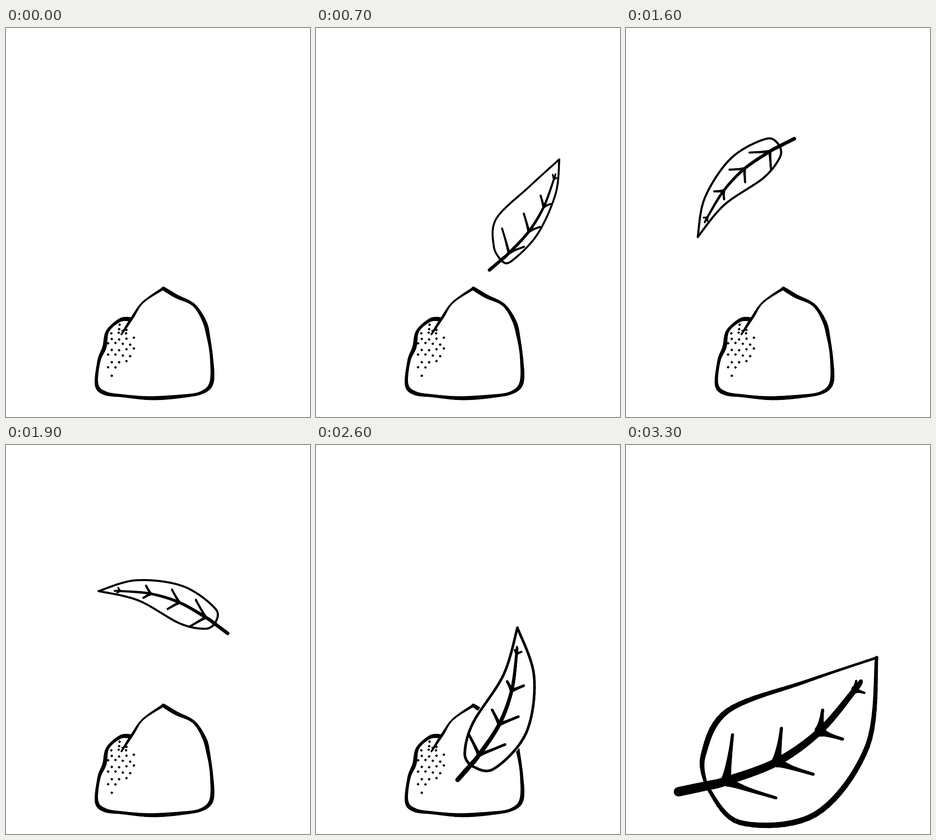
These frames come from a looping animation (661 px wide and 847 px high, 3500 ms). An HTML page with a canvas:

```html
<!DOCTYPE html>
<html lang="en">
<head>
<meta charset="utf-8">
<title>Falling leaf</title>
<style>
  html, body { margin: 0; width: 100%; height: 100%; overflow: hidden; background: #fff; }
  canvas { display: block; }
</style>
</head>
<body>
<canvas id="stage" width="661" height="847"></canvas>
<script>
const ctx = document.getElementById('stage').getContext('2d');
const LOOP = 3500, STEP = 100, LAST = 3300;

const lerp = (a, b, k) => a + (b - a) * k;
const clamp = (x, lo, hi) => Math.max(lo, Math.min(hi, x));
const points = text => text.split(/\s+/).map(p => p.split(',').map(Number));

// Catmull-Rom samples through the given points
function smooth(pts, n = 10) {
  const out = [], last = pts.length - 1;
  for (let i = 0; i < last; i++) {
    const a = pts[Math.max(0, i - 1)], b = pts[i], c = pts[i + 1], d = pts[Math.min(last, i + 2)];
    for (let u = 0; u < 1 - 1e-6; u += 1 / n) {
      out.push([0, 1].map(q => b[q] + u / 2 * (c[q] - a[q]
        + u * (2 * a[q] - 5 * b[q] + 4 * c[q] - d[q]
        + u * (3 * (b[q] - c[q]) + d[q] - a[q])))));
    }
  }
  return [...out, pts[last]];
}

// Stroke whose width is a function of the way along it, 0 to 1
function brush(pts, width) {
  const line = smooth(pts);
  for (let i = 1; i < line.length; i++) {
    ctx.lineWidth = width((i - 0.5) / (line.length - 1));
    ctx.beginPath();
    ctx.moveTo(...line[i - 1]);
    ctx.lineTo(...line[i]);
    ctx.stroke();
  }
}

const rockBody = points(`342,567 370,584 408,603 431,638 440,672 447,720 447,772 425,794 380,802
  315,806 255,801 215,795 197,776 202,725 214,695 221,660 248,636 270,634`);
const rockRidge = points('342,567 298,597 275,630 251,667');

function drawRock() {
  brush(rockBody, k => 7.6 + 1.2 * Math.sin(40 * k));
  brush(rockRidge, k => 4.8 + Math.cos(9 * k));
  brush([[251, 659], [262, 657]], k => 1.5 + k);

  // staggered rows of diamonds, thinning out at top and bottom
  for (let row = 0; row < 10; row++) {
    const count = Math.round(1 + 3 * Math.sin(Math.PI * (row + 0.5) / 10));
    for (let i = 0; i < count; i++) {
      const x = Math.max(222, 247 - 9 * row) + 8 * (row % 2) + 16 * i;
      const y = 646 + row * (9 + 0.35 * row) + 2 * Math.sin(5 * i + 3 * row);
      ctx.beginPath();
      ctx.moveTo(x - 3.2, y);
      ctx.lineTo(x, y - 3.2);
      ctx.lineTo(x + 3.2, y);
      ctx.lineTo(x, y + 3.2);
      ctx.fill();
    }
  }
}

// Time, stem end, tip, how far the left edge opens, width of the right edge
let turn = -Infinity;
const keys = [
  [100, [550, 213], [346, 53], 1, 0.72],
  [700, [377, 527], [529, 286], 1, 0.72],
  [1200, [142, 355], [352, 568], 0, 1],
  [1600, [366, 241], [156, 455], 0, 1],
  [2200, [455, 563], [373, 275], 0, 1],
  [2600, [308, 729], [438, 398], 0, 1.25],
  [3300, [114, 755], [545, 463], 1, 1.75]
].map(([t, stem, tip, open, swell]) => {
  const dx = tip[0] - stem[0], dy = tip[1] - stem[1];
  let angle = Math.atan2(dy, dx);
  while (angle < turn) angle += 2 * Math.PI; // always tumbles clockwise
  turn = angle;
  return { t, open, swell, v: [stem[0] + dx / 2, stem[1] + dy / 2, angle, Math.hypot(dx, dy)] };
});

// Smooth path in time through the keys
function poseAt(t) {
  let i = 0;
  while (i < keys.length - 2 && t >= keys[i + 1].t) i++;
  const a = keys[i], b = keys[i + 1], h = b.t - a.t, u = (t - a.t) / h;
  const slope = (j, q) => {
    const p = keys[Math.max(0, j - 1)], n = keys[Math.min(keys.length - 1, j + 1)];
    return (n.v[q] - p.v[q]) / (n.t - p.t);
  };
  const [x, y, angle, size] = a.v.map((v, q) => lerp(v, b.v[q], u * u * (3 - 2 * u))
    + h * u * (1 - u) * ((1 - u) * slope(i, q) - u * slope(i + 1, q)));
  return { x, y, angle, size, open: lerp(a.open, b.open, u), swell: lerp(a.swell, b.swell, u) };
}

function drawLeaf(t) {
  const { x, y, angle, size, open, swell } = poseAt(t);
  const line = (size - 75) / 50;
  const rib = line * (1.5 + 0.01 * line * line);
  const heavy = clamp((line - 5.5) / 3.5, 0, 1);

  // u runs from stem end to tip, v to the right of it
  const c = Math.cos(angle), s = Math.sin(angle);
  const at = (u, v) => [
    x + size * ((u - 0.5) * c - v * s),
    y + size * ((u - 0.5) * s + v * c)
  ];
  const spine = u => (0.08 + 0.03 * swell) * Math.sin(Math.PI * u);
  const base = at(0.11, spine(0.11)), tip = at(1, 0);
  const left = [base,
    at(0.17, lerp(-0.02, -0.067, open)),
    at(0.36, lerp(-0.04, -0.165, open)),
    at(0.70, lerp(0.026, -0.083, open)), tip];
  const right = [base,
    at(0.14, 0.143 * swell),
    at(0.42, 0.228 * swell),
    at(0.76, 0.163 * swell), tip];

  // white body with a thin halo
  ctx.beginPath();
  for (const p of [...smooth(left), ...smooth(right).reverse()]) ctx.lineTo(...p);
  ctx.closePath();
  ctx.fillStyle = ctx.strokeStyle = '#fff';
  ctx.lineWidth = line + 3;
  ctx.fill();
  ctx.stroke();
  ctx.fillStyle = ctx.strokeStyle = '#000';

  brush(left, k => line * (1 + 0.4 * heavy * Math.sin(6 * k - 0.8)));
  brush(right, k => line * (1 + heavy * (0.6 * Math.sin(Math.PI * k) - 0.2)));

  const midrib = [0, 0.11, 0.19, 0.41, 0.63, 0.85, 0.89].map(u => at(u, spine(u)));
  brush(midrib, k => rib * (1 - 0.6 * k * k));

  // four pairs of side veins, shorter towards the tip
  for (let i = 0; i < 4; i++) {
    const u = 0.19 + 0.22 * i, v = spine(u), reach = 0.1 - 0.027 * i;
    const l = reach * (1 + 0.45 * open), r = reach * swell;
    const thick = line * (i === 3 ? 0.8 : 1.1);
    for (const [du, dv] of [[0.9 * l, -l], [reach * (0.8 + 0.3 * swell), r]]) {
      const bend = at(u + du * 0.5 - dv * 0.06, v + dv * 0.5 - du * 0.06);
      brush([at(u, v), bend, at(u + du, v + dv)],
        k => thick * (0.9 - 0.25 * heavy * k + (0.5 + heavy) * (1 - k) ** 3));
    }
  }
}

ctx.lineCap = ctx.lineJoin = 'round';
const start = performance.now();
let shown = -1;
function tick() {
  const now = Math.max(0, performance.now() - start) % LOOP;
  const t = Math.min(LAST, Math.floor(now / STEP) * STEP);
  if (t !== shown) {
    shown = t;
    ctx.clearRect(0, 0, 661, 847);
    drawRock();
    if (t >= STEP) drawLeaf(t);
  }
  requestAnimationFrame(tick);
}
tick();
</script>
</body>
</html>
```
